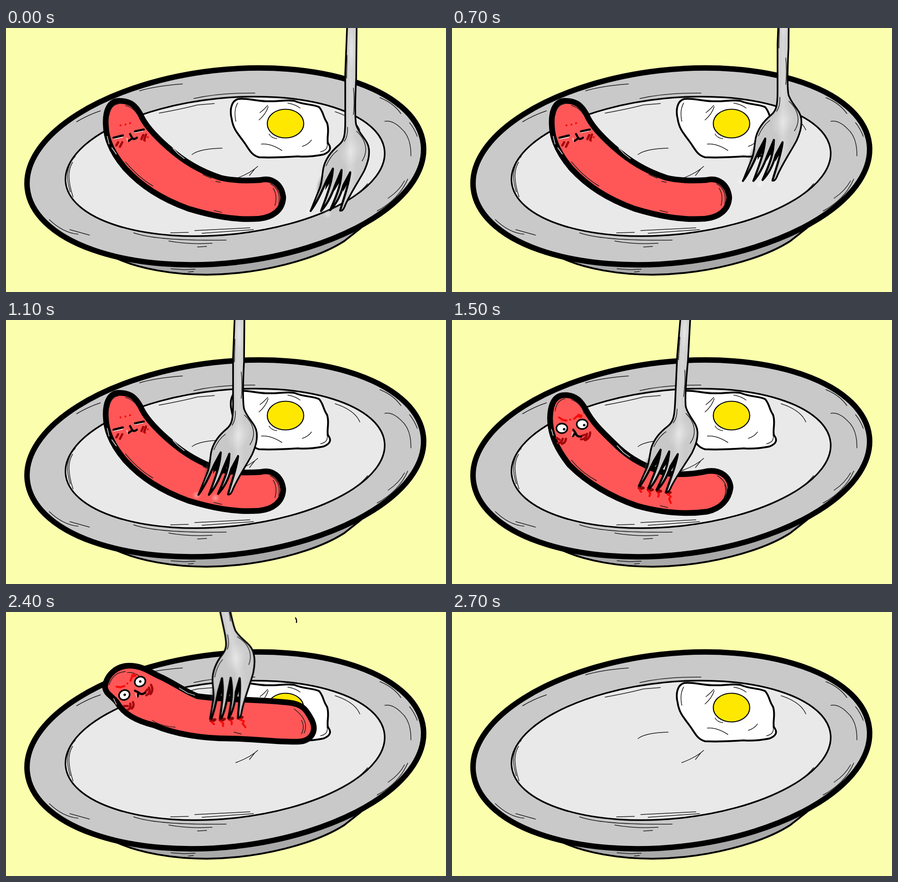
An HTML page that plays this animation: 965x580 px, repeating every 2900 ms.

```html
<!DOCTYPE html>
<html lang="en">
<head>
<meta charset="utf-8">
<title>Breakfast</title>
<style>
html, body { margin: 0; width: 100%; height: 100%; overflow: hidden; background: #fbffad; }
svg { display: block; width: 100vw; height: 100vh; }
path, ellipse, circle { stroke-linecap: round; stroke-linejoin: round; }
.line { fill: none; stroke: #1c1c1c; stroke-width: 1.5; }
.ink { fill: none; stroke: #000; }
.meat { fill: #ff5757; stroke: #000; stroke-width: 12.5; }
.shine { fill: none; stroke: #fff; stroke-width: 1.3; }
.red { fill: none; stroke: #f60d0d; stroke-width: 4.4; }
.blush { fill: none; stroke: #a3080c; stroke-width: 5; }

.anim { animation: 2900ms step-end infinite; }
#calm { animation-name: calm; }
#swing { animation-name: swing; }
#hit { animation-name: hit; }
#lift { animation-name: lift; }
#wince { animation-name: wince; }
#glance { animation-name: glance; }
#stare { animation-name: stare; }

@keyframes calm {
  0% { visibility: visible; }
  41.379%, 100% { visibility: hidden; }
}
@keyframes swing {
  0% { visibility: visible; transform: translate(0, 0); }
  17.241% { transform: translate(26px, -29px); }
  20.689% { transform: translate(55px, -58px); }
  24.137% { transform: translate(-30px, -66px); }
  27.586% { transform: translate(-113px, -73px); }
  31.034% { transform: translate(-197px, -79px); }
  34.482% { transform: translate(-222px, -49px); }
  37.931% { transform: translate(-246px, -18px); visibility: visible; }
  41.379%, 100% { transform: translate(-246px, -18px); visibility: hidden; }
}
@keyframes hit {
  0% { visibility: hidden; }
  41.379% { visibility: visible; }
  82.758%, 100% { visibility: hidden; }
}
@keyframes lift {
  0% { visibility: hidden; transform: translate(0, 0); }
  82.758% { visibility: visible; transform: translate(0, 0); }
  86.206% { visibility: visible; transform: translate(-28px, -88px); }
  89.655% { visibility: visible; transform: translate(-57px, -185px); }
  93.103%, 100% { visibility: hidden; transform: translate(-57px, -185px); }
}
@keyframes wince {
  0%, 100% { opacity: 0; }
  41.379% { opacity: 1; }
  51.724% { opacity: 0; }
}
@keyframes glance {
  0%, 100% { opacity: 0; }
  51.724% { opacity: 1; }
  62.068% { opacity: 0; }
}
@keyframes stare {
  0%, 100% { opacity: 0; }
  62.068% { opacity: 1; }
}
</style>
</head>
<body>
<svg viewBox="0 0 965 580" preserveAspectRatio="none">
  <defs>
    <linearGradient id="steel" gradientUnits="userSpaceOnUse" x1="743" y1="0" x2="770" y2="0">
      <stop offset="0" stop-color="#c8c8c8"/>
      <stop offset=".45" stop-color="#d6d6d6"/>
      <stop offset="1" stop-color="#cbcbcb"/>
    </linearGradient>
    <radialGradient id="glow">
      <stop offset="0" stop-color="#fff" stop-opacity=".4"/>
      <stop offset="1" stop-color="#fff" stop-opacity="0"/>
    </radialGradient>
    <radialGradient id="smudge">
      <stop offset="0" stop-color="#444" stop-opacity=".5"/>
      <stop offset="1" stop-color="#444" stop-opacity="0"/>
    </radialGradient>
    <clipPath id="sunk">
      <path d="M300-500H800V330L490 384 400 364 300 340Z"/>
    </clipPath>

    <g id="fork">
      <path d="M748-330V0L744 100 744 205C744 235 742 247 730 257C712 272 700 290 696 308C693 325 693 340 688 352L668 402C682 383 696 352 703 335L717 309C715 335 710 352 691 402C706 386 716 362 722 345L736 312C735 340 730 358 711 400C727 384 736 360 740 345L755 317C752 345 741 372 733 401Q738 403 742 394C752 368 774 336 786 313C796 290 797 278 796 266C794 246 776 236 768 213C764 192 767 130 768 110L769 0V-330Z" fill="url(#steel)"/>
      <ellipse cx="756" cy="272" rx="24" ry="34" transform="rotate(25 756 272)" fill="url(#glow)"/>
      <ellipse cx="758" cy="50" rx="9" ry="45" fill="url(#glow)"/>
      <ellipse cx="689" cy="346" rx="8" ry="26" transform="rotate(12 689 346)" fill="url(#smudge)"/>
      <path class="ink" stroke-width="3.6" d="M748-330V0L744 100 744 205C744 235 742 247 730 257C712 272 700 290 696 308C693 325 693 340 688 352L668 402M769-330V0L768 110C767 130 764 192 768 213C776 236 794 246 796 266C797 278 796 290 786 313C774 336 752 368 742 394Q738 403 733 401"/>
      <path class="ink" stroke-width="4.6" d="M668 402C682 383 696 352 703 335L717 309C715 335 710 352 691 402C706 386 716 362 722 345L736 312C735 340 730 358 711 400C727 384 736 360 740 345L755 317C752 345 741 372 733 401"/>
      <path d="M717 309L702 340 700 356 713 336ZM736 312L721 345 720 358 732 338ZM755 317L740 348 739 360 750 340Z" fill="#000"/>
      <path class="line" d="M748 60L747 110M762 132Q765 160 762 190M769 227Q788 244 789 266Q789 280 781 292M702 303Q712 280 727 269M749 218Q750 238 742 249"/>
    </g>
    <g id="stab" clip-path="url(#sunk)">
      <use href="#fork" transform="translate(-3 -4) rotate(2.6 511 60) translate(-246 -18)"/>
    </g>

    <g id="wounds">
      <g fill="#8d0508">
        <ellipse cx="415" cy="369" rx="8" ry="4"/>
        <ellipse cx="435" cy="373" rx="8" ry="4"/>
        <ellipse cx="454" cy="376" rx="7" ry="4"/>
        <ellipse cx="474" cy="379" rx="8" ry="4"/>
      </g>
      <path class="red" d="M411 372L415 378M431 376L435 381 433 387M452 380L454 384 452 388M473 383L480 388 476 393 480 402"/>
    </g>

    <g id="shock">
      <path class="red" d="M235 214L242 219 251 221M268 217L275 211 283 213M277 208L284 210M259 219h.1"/>
      <path class="blush" d="M229 259L236 263M232 270Q240 271 243 261M241 272Q249 270 250 261M283 262Q295 262 296 250M292 264Q303 260 303 247M284 255L291 252"/>
      <path class="ink" stroke-width="4.6" d="M266 241L271 248 265 255M271 248Q273 257 283 256"/>
      <path class="shine" d="M264 247L263 255"/>
    </g>

    <g id="eyes" fill="#fff" stroke="#000" stroke-width="3.4">
      <ellipse cx="241" cy="238" rx="12" ry="10.5"/>
      <ellipse cx="285.5" cy="229" rx="12" ry="10.5"/>
    </g>
    <g id="pupils">
      <circle cx="242" cy="238" r="2.7"/>
      <circle cx="286" cy="229" r="2.7"/>
    </g>
  </defs>

  <rect width="965" height="580" fill="#fbffad"/>

  <g id="plate">
    <path d="M236 503C290 530 370 542 440 542C560 541 680 508 742 468L780 438Z" fill="#a9a9a9" stroke="#000" stroke-width="4"/>
    <path class="line" d="M362 529L390 531 415 530M400 536L411 535"/>
    <ellipse cx="481" cy="304" rx="437" ry="212" transform="rotate(-6.4 481 304)" fill="#c9c9c9" stroke="#000" stroke-width="12"/>
    <ellipse cx="480.5" cy="304" rx="351.5" ry="150" transform="rotate(-5.7 480.5 304)" fill="#e9e9e9" stroke="#000" stroke-width="3.5"/>
    <path class="line" d="M293 138Q330 127 387 123M155 206Q180 191 207 182M412 155Q470 142 546 143M336 187Q390 177 420 169L457 166M408 278Q425 265 474 264M504 331Q536 319 552 304M534 324L546 309M820 153Q850 165 866 188M831 205Q848 202 867 221Q889 240 888 281M885 208Q895 220 902 238M722 184Q765 198 776 224M881 332Q862 376 814 402M874 336Q862 358 838 374M793 342Q770 372 697 406M95 421Q125 450 158 453M140 443L183 455M152 282Q125 310 141 360M146 295Q130 320 147 371M280 450Q330 468 483 466M357 468Q400 476 452 473M420 481L440 480M361 450L400 449M414 445L535 439M430 451L543 443"/>
  </g>

  <g id="egg">
    <path d="M509 156C525 153 545 160 570 161C600 162 612 157 632 160C655 170 675 167 687 174C697 186 695 195 704 208C710 225 703 240 706 253C716 265 709 273 696 278C680 281 660 284 640 282C610 284 580 285 555 284C540 280 535 270 525 255C510 233 499 225 495 200C490 180 494 160 509 156Z" fill="#fff" stroke="#000" stroke-width="4"/>
    <ellipse cx="613" cy="210" rx="40" ry="31.5" fill="#ffe800" stroke="#000" stroke-width="2.2"/>
    <path class="line" d="M575 173Q570 189 555 202M574 170Q565 180 557 186M560 255Q580 253 605 269M650 260Q663 256 670 246M577 233Q582 242 594 243M508 165Q499 180 504 205M618 165Q635 168 645 176M704 252Q708 268 690 272"/>
  </g>

  <g id="calm" class="anim">
    <path class="meat" d="M219 215C217 185 225 161 247 160C275 160 285 172 295 190C305 215 330 240 355 262C390 293 425 314 470 329C500 336 530 336 558 334C585 327 605 345 608 372C607 400 585 416 555 419C500 423 450 412 400 397C340 375 297 347 262 309C238 281 220 250 219 215Z"/>
    <path class="line" d="M226 192Q230 169 246 167M262 170Q280 175 288 190M262 294Q290 328 322 347M456 401L473 405M432 322L450 330M460 337L470 339M580 342Q604 355 598 387M586 352Q596 368 590 390"/>
    <path class="shine" d="M366 264L377 276 391 287M222 238L226 255M232 263L242 277M236 244L256 240M282 230L301 226M265 242L267 250"/>
    <path class="ink" stroke-width="4.8" d="M236 241L256 236M283 227L302 223"/>
    <path class="ink" stroke-width="4.6" d="M272 233L277 242 269 248M277 242Q281 246 287 241"/>
    <path class="red" d="M251 214h.1M262 212h.1M272 209h.1M311 240h.1M305 248h.1"/>
    <path class="blush" d="M242 258L246 251M250 261L255 251M297 244L301 235M303 246L307 234"/>
  </g>

  <g id="swing" class="anim">
    <circle cx="664" cy="403" r="10" fill="url(#glow)"/>
    <circle cx="705" cy="409" r="10" fill="url(#glow)"/>
    <use href="#fork"/>
  </g>

  <g id="hit" class="anim">
    <path class="meat" d="M215 215C216 180 228 165 247 165C272 164 284 180 294 198C310 230 340 255 365 280C395 308 430 325 470 337C500 341 535 338 560 332C590 328 609 345 611 368C607 395 590 414 560 421C510 428 455 422 405 408C350 389 296 358 257 318C233 287 215 255 215 215Z"/>
    <path class="line" d="M226 200Q230 175 248 173M262 175Q283 182 290 206M262 308Q285 336 317 353M457 408L473 412M582 342Q610 360 600 392M598 362Q603 375 597 390"/>
    <path class="shine" d="M362 276L376 291 390 301M218 240L222 254"/>
    <use href="#shock"/>
    <g id="wince" class="anim">
      <path class="ink" stroke-width="4" d="M225 232L250 239 228 249M296 217L273 230 296 238"/>
    </g>
    <g id="glance" class="anim">
      <use href="#eyes"/>
      <use href="#pupils" x="4" y="2"/>
    </g>
    <g id="stare" class="anim">
      <use href="#eyes"/>
      <use href="#pupils"/>
    </g>
    <use href="#wounds"/>
    <use href="#stab"/>
  </g>

  <g id="lift" class="anim">
    <path class="meat" d="M217 163C222 135 245 118 270 118C300 118 315 132 340 143C370 157 395 176 420 185C470 193 560 192 620 199C652 202 660 217 671 238C682 262 670 284 640 285C590 286 540 278 490 278C430 278 370 268 325 249C285 239 258 224 243 198C230 182 218 180 217 163Z"/>
    <path class="line" d="M226 160Q235 132 262 131M266 133Q285 131 302 150M321 238Q340 251 371 253M500 264L516 268M632 213Q666 238 654 266M648 238Q656 252 648 268"/>
    <path class="shine" d="M380 167L398 178 414 183M236 190L242 203"/>
    <g transform="translate(13.5 -66) rotate(-29 263.5 233.5)">
      <use href="#shock"/>
      <use href="#eyes"/>
      <use href="#pupils"/>
    </g>
    <g transform="translate(39 -139) rotate(-14.8 445 373)">
      <use href="#wounds"/>
      <use href="#stab"/>
    </g>
    <path class="ink" stroke-width="2.4" d="M635 13Q638 17 637 23"/>
  </g>
</svg>
</body>
</html>
```
